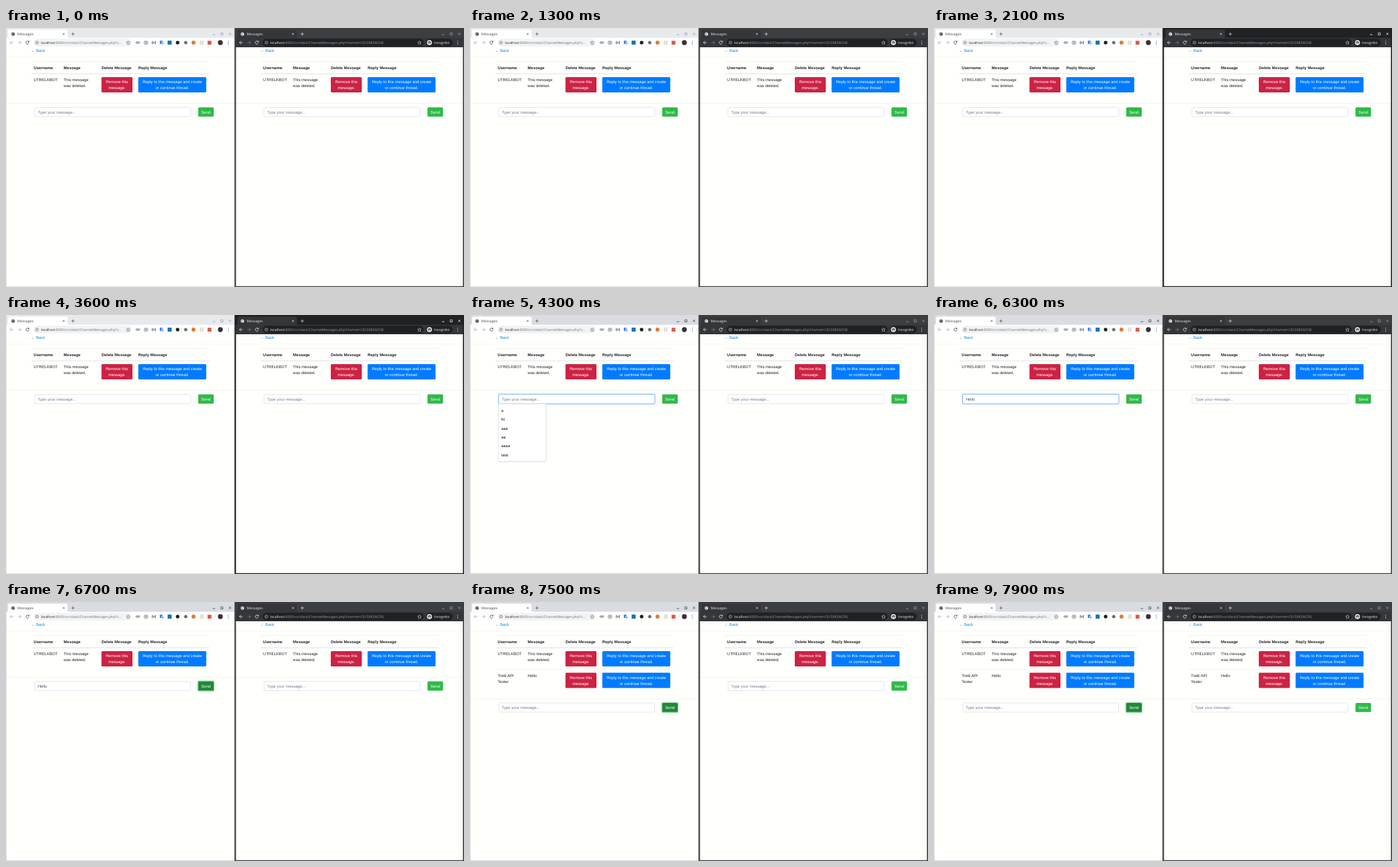
These frames come from a looping animation (688x390 px, 8000 ms). An HTML page:

```html
<!DOCTYPE html>
<html lang="en">
<head>
<meta charset="utf-8">
<title>Messages</title>
<style>
html, body { margin: 0; width: 100%; height: 100%; overflow: hidden; background: #fffffc; }
svg { display: block; width: 688px; height: 390px; text-rendering: geometricPrecision; }
text { font: 6px "Liberation Sans", Arial, sans-serif; fill: #212529; white-space: pre; }
.ui { font-family: "Open Sans", sans-serif; font-size: 5.3px; }
.url { font-size: 5.1px; }
.bold { font-weight: 700; }
.mid { text-anchor: middle; }
.option { font-size: 5.7px; font-weight: 600; }
</style>
</head>
<body>
<svg id="stage" viewBox="0 0 688 390"></svg>
<script>
const LOOP = 8000, ROW = 32.4, RIGHT = 344.5;
const stage = document.getElementById('stage');

const rect = (x, y, w, h, fill, r = 0, extra = '') =>
  `<rect x="${x}" y="${y}" width="${w}" height="${h}" rx="${r}" fill="${fill}" ${extra}/>`;
const text = (x, y, s, cls = '', fill = '') =>
  `<text x="${x}" y="${y}" class="${cls}" ${fill && `style="fill:${fill}"`}>${s}</text>`;
const line = (d, color, w = 0.8) =>
  `<path d="${d}" fill="none" stroke="${color}" stroke-width="${w}"/>`;
const dot = (x, y, r, fill) => `<circle cx="${x}" cy="${y}" r="${r}" fill="${fill}"/>`;
const ramp = (t, start, length = 150) => Math.min(1, Math.max(0, (t - start) / length));
const mix = (a, b, k) => `rgb(${a.map((v, i) => Math.round(v + (b[i] - v) * k))})`;

const light = {
  x: 0, bar: ['#e7eaed', '#d9dce0'], tool: '#ffffff', omni: '#f1f3f4', omniWidth: 148,
  ink: '#45494d', faint: '#a8abae', controls: ['#989b9e', '#303336'], back: '#a8abae',
  edge: ['#d4d4dc', '#c4c4cc'], host: '#202124', path: '#6c7074', query: 'c...', dots: 334
};
const dark = {
  x: RIGHT, bar: ['#3c3f42', '#202225'], tool: '#35363a', omni: '#202124', omniWidth: 242,
  ink: '#e4e6e8', faint: '#7d8084', controls: ['#a0a3a6', '#ffffff'], back: '#e4e6e8',
  edge: ['#3c3f42', '#202225'], host: '#f1f3f4', path: '#9aa0a6',
  query: 'channel=C81Z6R3ACDB', dots: 334
};

function extensions() {
  const grey = '#5f6368';
  return line('M195 21.5q2-1.5 3 0q1-1.5 3 0q-2 3-3 1.5q-1 1.5-3-1.5z', grey, 1) +
    rect(207.8, 20, 5, 4.2, 'none', 0.8, `stroke="${grey}" stroke-width=".8"`) + dot(210.3, 22, 0.9, grey) +
    line('M219.5 20v4l2.5-2zM224.5 20v4l-2.5-2z', grey) +
    rect(231, 19, 4, 5, '#4285f4', 0.5) + rect(233.5, 20.5, 3.5, 4.5, '#b9c4d6', 0.5) +
    rect(242.8, 19, 6, 6, '#0077b5', 0.6) + dot(257.8, 22, 2.7, '#202124') +
    dot(270, 22, 2.5, '#6b6d70') + dot(281.7, 22, 3, '#e07a2c') +
    rect(291.3, 19.3, 5.4, 5.4, '#efe3d3', 0.5, 'stroke="#d9c6b0" stroke-width=".5"') +
    rect(302.8, 19.2, 5.8, 5.8, '#dd5b43', 0.6) + line('M314 18v8', '#d5d7da', 0.5) +
    dot(322, 22, 3.7, '#3d3033');
}

function chrome(c, active) {
  const { ink, faint } = c, bar = c.bar[active], ctl = c.controls[active];
  const star = c === light ? 183.5 : 276.7;
  return rect(0, 0, 343.5, 15, bar) +
    `<path d="M0.5 15q2.5 0 2.5-2.5V5q0-2.5 2.5-2.5H90q2.5 0 2.5 2.5v7.5q0 2.5 2.5 2.5z" fill="${c.tool}"/>` +
    rect(0, 14.8, 343.5, 14.2, c.tool) +
    dot(10.7, 9, 2.6, ink) + line('M9 8.2l1.5 1-.5 1.2M11 7l1.4 1.2', c.tool, 0.7) +
    text(17, 11, 'Messages', 'ui', ink) +
    line('M85.2 7.7l2.7 2.7M87.9 7.7l-2.7 2.7', ink, 0.7) +
    line('M98.2 9h4.8M100.6 6.6v4.8', ink, 0.7) +
    line('M310.5 10h3.6', ctl) + line('M322.7 7.3h3.2v3.2h-3.2z', ctl, 0.7) +
    line('M335 7.3l3 3M338 7.3l-3 3', ctl) +
    line('M11.2 22H6.2M8.5 19.6L6.1 22l2.4 2.4', c.back) +
    line('M18 22h5M20.7 19.6l2.4 2.4-2.4 2.4', faint) +
    line('M34.2 20.6a2.3 2.3 0 1 0 .3 2.2M34.7 19.2v1.9h-1.9', ink) +
    rect(41, 16.3, c.omniWidth, 11.4, c.omni, 5.7) +
    line('M44.4 22a2.2 2.2 0 1 0 4.4 0a2.2 2.2 0 1 0 -4.4 0M46.6 21.6v1.5M46.6 20.5v.6', ink, 0.55) +
    `<text x="52.4" y="23.9" class="ui url" style="fill:${c.path}"><tspan fill="${c.host}">localhost</tspan>` +
    `:8000/src/slack/ChannelMessages.php?${c.query}</text>` +
    line(`M${star} 19.4l.8 1.8 2 .2-1.5 1.3.4 2-1.7-1-1.7 1 .4-2-1.5-1.3 2-.2z`, ink, 0.55) +
    (c === light ? extensions() :
      rect(286.2, 16.3, 40.5, 11.4, '#202124', 5.7) + dot(291.6, 22, 3.8, '#f1f3f4') +
      line('M288.9 21.6h5.4M290.2 20.5h2.8', '#35363a', 0.9) +
      dot(290.4, 23.3, 0.8, '#35363a') + dot(292.8, 23.3, 0.8, '#35363a') +
      text(298.6, 24, 'Incognito', 'ui', '#f1f3f4')) +
    [19.8, 22, 24.2].map(y => dot(c.dots, y, 0.6, ink)).join('');
}

function button(x, y, w, h, fill, ...lines) {
  return rect(x, y, w, h, fill, 1.5) +
    lines.map((s, i) => text(x + w / 2, y + 9.1 + i * 9, s, 'mid', '#fff')).join('');
}

function message(i, user, body) {
  const y = 69 + i * ROW;
  const cell = (x, lines) => lines.map((s, n) => text(x, y + 11.3 + n * 9, s)).join('');
  return (i ? line(`M38 ${y}H305.5`, '#dee2e6', 0.5) : '') + cell(41.6, user) + cell(86.6, body) +
    button(143.4, y + 5, 46.6, 23, '#cc2244', 'Remove this', 'message.') +
    button(198.7, y + 5, 102.1, 23, '#007bff', 'Reply to this message and create', 'or continue thread.');
}

function page(s) {
  const shift = s.rows > 1 ? ROW : 0;
  const heads = [[41.6, 'Username'], [86.6, 'Message'], [143.4, 'Delete Message'], [198.7, 'Reply Message']];
  const ringed = (x, w, color, k) => k ?
    rect(x - 0.6, 118.9, w + 1.2, 15.2, 'none', 2, `stroke="${color}" stroke-width="1.2" opacity="${k}"`) : '';
  const caretX = 48.1 + [0, 4.3, 7.7, 9, 10.3, 13.7][s.typed.length];
  return text(37.5, 35.9, '← Back', '', '#1583e6') + line('M0 43.8H343', '#ebebe9', 0.5) +
    line('M38 50.6H305.5', '#dee2e6', 0.5) + line('M38 69H305.5', '#d4d8dc', 0.8) +
    heads.map(([x, label]) => text(x, 61.7, label, 'bold')).join('') +
    message(0, ['UTRELKBOT'], ['This message', 'was deleted.']) +
    (shift && message(1, ['Trelk API', 'Tester'], ['Hello']) || '') +
    `<g transform="translate(0 ${shift})">` + line('M0 113.4H343', '#e3e3e1', 0.5) +
    ringed(43.2, 234.2, '#a9cffb', s.focus) +
    rect(43.2, 119.7, 234.2, 13.7, '#fff', 1.5,
      `stroke="${mix([206, 212, 218], [118, 178, 250], s.focus)}" stroke-width=".6"`) +
    text(47.7, 128.7, s.typed || 'Type your message...', '', s.typed ? '#495057' : '#757c83') +
    (s.caret ? line(`M${caretX} 123.3v6.6`, '#333', 0.5) : '') +
    ringed(288.7, 23.3, '#9bd9a8', s.pressed) +
    button(288.7, 119.6, 23.3, 13.8, mix([46, 186, 72], [33, 136, 56], s.pressed), 'Send') + '</g>' +
    (s.menu ? rect(42.6, 134.6, 72, 87, '#000', 1, 'opacity=".1"') +
      rect(42.6, 133.8, 71.6, 86.6, '#fff', 1, 'stroke="#d2d3d5" stroke-width=".5"') +
      ['a', 'hi', 'aaa', 'aa', 'aaaa', 'test'].map((o, i) => text(47, 146 + i * 13.35, o, 'ui option')).join('') : '');
}

function browser(c, active, state) {
  const edge = c.edge[active], w = c === dark ? 1.6 : 0.8;
  return `<g transform="translate(${c.x} 0)">` + rect(0, 0, 343.5, 390, '#fffffc') + page(state) +
    chrome(c, active) + line(`M0.2 0V390M${c === dark ? 342.7 : 343} 0V390M0 389.6H343.5`, edge, w) + '</g>';
}

function scene(t) {
  const keys = [4700, 4900, 5000, 5100, 5300];
  const typed = t < 7500 ? 'Hello'.slice(0, keys.filter(k => t >= k).length) : '';
  const lastInput = Math.max(3700, ...keys.filter(k => t >= k));
  const focused = t >= 3700 && t < 6300;
  const left = {
    rows: t >= 7500 ? 2 : 1, typed,
    focus: ramp(t, 3700) - ramp(t, 6300),
    caret: focused && (t - lastInput) % 1100 < 550,
    pressed: ramp(t, 6350),
    menu: t >= 3800 && t < 4700
  };
  const right = { rows: t >= 7700 ? 2 : 1, typed: '', focus: 0, pressed: 0 };
  return browser(light, +(t >= 3700), left) +
    browser(dark, +(t >= 2000 && t < 3700), right) +
    rect(343.4, 0, 1.6, 390, t >= 2000 && t < 3700 ? '#1d1f21' : '#3a3c3f');
}

let shown = '';
function frame() {
  const next = scene(performance.now() % LOOP);
  if (next !== shown) stage.innerHTML = shown = next;
  requestAnimationFrame(frame);
}
frame();
</script>
</body>
</html>
```
